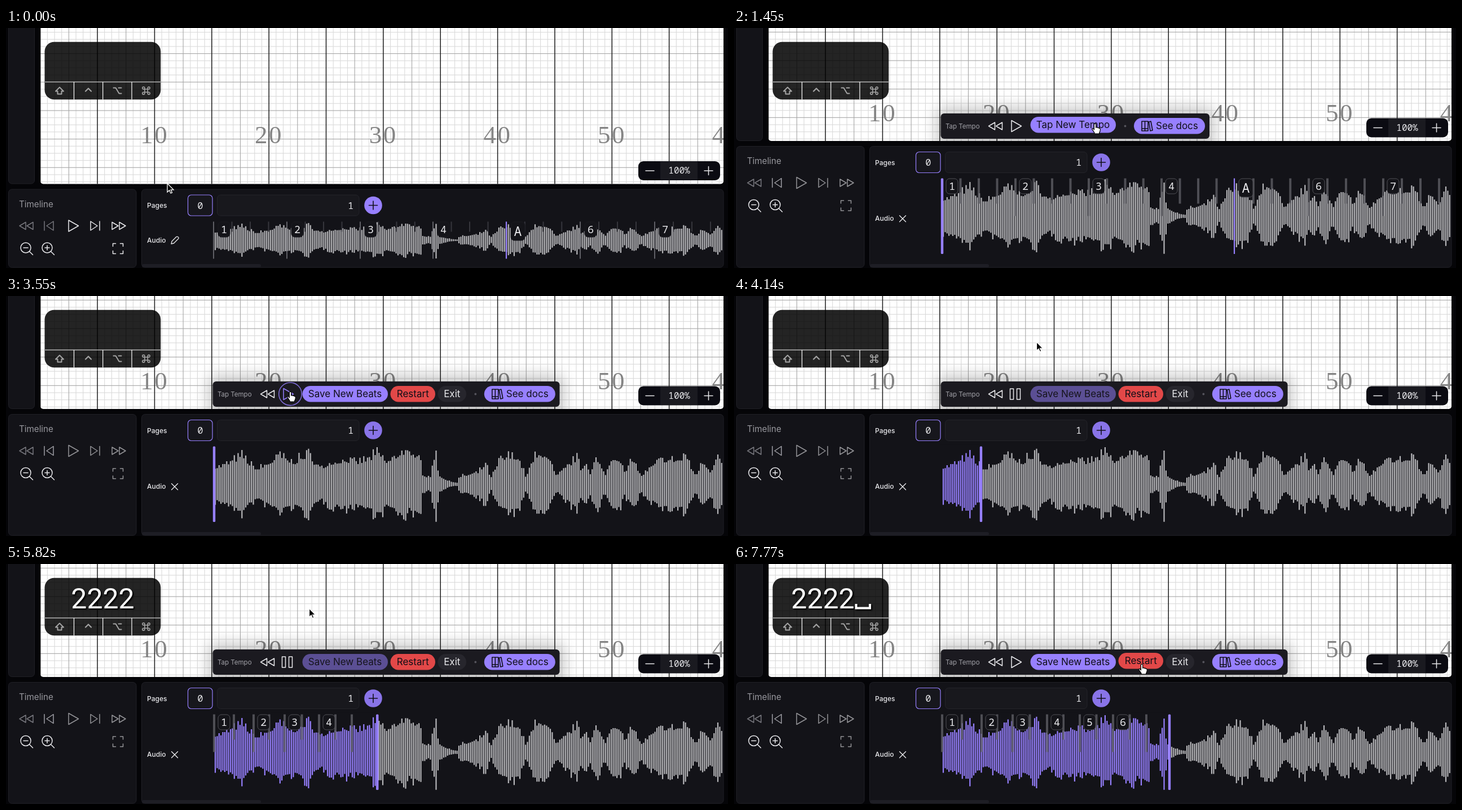
Write an HTML page that moves like this. It is 1280 px wide and 427 px high and loops after 8 s.

```html
<!DOCTYPE html>
<html lang="en">
<head>
<meta charset="utf-8">
<title>Tap tempo</title>
<style>
html, body { margin: 0; width: 100%; height: 100%; overflow: hidden; background: #050508; }
svg { display: block; width: 100%; height: 100%; }
text { font-family: Inter, "Open Sans", sans-serif; white-space: pre; }
.mono { font-family: "Noto Sans Mono", "DejaVu Sans Mono", monospace; }
.serif { font-family: "Liberation Serif", "Noto Serif", serif; letter-spacing: 2.5px; }
.keys { font-family: Roboto, "Liberation Sans", sans-serif; }
.icon { fill: none; stroke-linecap: round; stroke-linejoin: round; }
</style>
</head>
<body>
<svg id="stage" viewBox="0 0 1280 427" xmlns="http://www.w3.org/2000/svg"></svg>
<script>
const LOOP = 8000, FPS = 22;
const EDIT_AT = 360, TAP_AT = 2270, RING_AT = 3540, PLAY_AT = 3610, SPEED = 0.131;
const START_X = 369, STOP_X = 772;
const STOP_AT = PLAY_AT + (STOP_X - START_X) / SPEED - 8;
const BARLINES = [369, 439, 494, 555, 613, 672, 731];
const MEASURES = [368, 498, 628, 757, 887, 1018, 1150, 1282];
const PURPLE = '#9780ff', INK = '#100f17', PANEL = '#131318', EDGE = '#202026', LIGHT = '#e9e9ec', GREY = '#98989e';
const UNIT = 12.67, LEFT = 60.7;

// markup helpers
const rect = (x, y, w, h, r, fill, extra = '') =>
  `<rect x="${x}" y="${y}" width="${w}" height="${h}" rx="${r}" fill="${fill}" ${extra}/>`;
const text = (x, y, s, size, fill, anchor = 'start', extra = '') =>
  `<text x="${x}" y="${y}" font-size="${size}" fill="${fill}" text-anchor="${anchor}" ${extra}>${s}</text>`;
const icon = (x, y, d, color = LIGHT, width = 1.5, extra = '') =>
  `<path class="icon" transform="translate(${x} ${y})" d="${d}" stroke="${color}" stroke-width="${width}" ${extra}/>`;
const group = (id, body, extra = '') => `<g id="${id}" ${extra}>${body}</g>`;
const span = (n, f) => Array.from({ length: n }, (_, i) => f(i)).join('');
const vline = (x, y, h, w, color) => rect(x - w / 2, y, w, h, 0, color);

const D = {
  rewind: 'M-1-6.5V6.5L-12 0zM12-6.5V6.5L1 0z',
  forward: 'M1-6.5V6.5L12 0zM-12-6.5V6.5L-1 0z',
  prev: 'M8-8V8L-4 0zM-8-8V8',
  next: 'M-8-8V8L4 0zM8-8V8',
  play: 'M-8-10V10L9.5 0z',
  pause: 'M-9-9.500H-3V9.500H-9zM3-9.500H9V9.500H3z',
  lens: 'M7.500-1.500a9 9 0 1 1-18 0a9 9 0 1 1 18 0M5 5L11 11M-5.500-1.500H2.500',
  plusBar: 'M-1.500-5.500V2.500',
  full: 'M-9-4V-9H-4M4-9H9V-4M9 4V9H4M-4 9H-9V4',
  pencil: 'M-6.500 6.500L-5.500 2L2.500-6Q4-7 5.700-5.500T6-2.500L-2 5.500z',
  cross: 'M-5.500-5.500L5.500 5.500M5.500-5.500L-5.500 5.500',
  minus: 'M-7.500 0H7.500',
  plus: 'M-7.500 0H7.500M0-7.500V7.500',
  books: 'M-9-8H-3.500V9H-9zM-3.500-8H2V9H-3.500zM-9 5H2M3.500-7L7-8L10 8L6 9z',
  shift: 'M0-6.500L7 .5H3.500V5.500H-3.500V.5H-7z',
  ctrl: 'M-5 1.500L0-3.500L5 1.500',
  option: 'M-7-5H-3L3 5H7M2-5H7',
  arrow: 'M0 0V15.500L3.600 12.200L6 17.500L8.500 16.400L6.200 11.300H11z',
  hand: 'M-.6-.2a1.600 1.600 0 0 1 3.200 0V5c1-.8 2.600-.5 2.900.6 1-.6 2.400-.2 2.700.9 1.200-.4 2.200.4 2.200 1.600 0 4-.8 5-1.800 6.500V16H0v-1.500C-1 12.500-3 10-4.200 8.200c-.8-1.300.9-2.400 2-1.200L-.6 8.500z'
};

function gridLines() {
  const shade = i => i % 8 === 0 ? '#1c1c1c' : i % 4 === 0 ? '#a6a6a6' : '#dadada';
  const cols = i => vline(LEFT + i * UNIT, -20, 360, i % 8 ? 1.1 : 1.5, shade(i));
  const rows = i => rect(LEFT, 45.5 + (i - 4) * UNIT - .5, 1215, 1.1, 0, i % 4 ? '#dadada' : '#a6a6a6');
  const ids = [...Array(97).keys()];
  return ids.filter(i => i % 4).map(cols).join('') + span(24, rows) +
    ids.filter(i => i % 4 === 0).map(cols).join('') +
    ['10', '20', '30', '40', '50', '40'].map((s, i) =>
      text(LEFT + UNIT * 16 * (i + 1) - 25.2, 204.5, s, 45, '#858585', 'start', 'class="serif"')).join('');
}

// loudness: x position and half height in px
const LOUD = [[369, 34], [385, 38], [400, 46], [412, 52], [420, 59], [432, 40], [446, 30], [458, 38], [470, 46],
  [483, 52], [486, 67], [490, 52], [512, 44], [524, 52], [538, 62], [547, 42], [560, 32], [572, 42], [604, 49],
  [618, 42], [650, 54], [660, 64], [676, 44], [689, 54], [703, 68], [716, 52], [734, 66], [738, 20], [752, 11],
  [757, 50], [763, 62], [767, 18], [785, 6], [800, 3], [804, 15], [838, 24], [850, 42], [860, 12], [875, 48],
  [890, 56], [908, 54], [922, 14], [936, 52], [957, 62], [976, 15], [1012, 52], [1020, 28], [1028, 46],
  [1036, 22], [1046, 52], [1062, 18], [1075, 54], [1089, 50], [1096, 22], [1113, 50], [1125, 16], [1160, 48],
  [1198, 50], [1204, 68], [1210, 42], [1223, 18], [1236, 46], [1250, 24], [1262, 66], [1272, 32]];

function wavePath() {
  let seed = 7, d = '';
  const rnd = () => (seed = seed * 16807 % 2147483647) / 2147483647;
  for (let x = 371, k = 0; x < 1271; x += 3.375) {
    while (LOUD[k + 1][0] < x) k++;
    const [[x0, a], [x1, b]] = [LOUD[k], LOUD[k + 1]];
    const h = a + (b - a) * (x - x0) / (x1 - x0);
    // mostly even bars with a few sharp peaks
    const reach = () => Math.min(67, h * (.8 + .34 * rnd() ** 3)).toFixed(1);
    d += `M${x.toFixed(1)} -${reach()}V${reach()}`;
  }
  return d;
}

const badge = (x, y, s, edge) => {
  const big = s === 'A', w = big ? 25 : 21, h = big ? 33 : 27;
  return rect(x + 8, y + .5, w, h, 6, '#141419', `stroke="${edge}"`) +
    text(x + 8 + w / 2, y + (big ? 25.5 : 20.5), s, big ? 23 : 18.5, LIGHT, 'middle', 'class="mono"');
};
const measureName = i => i === 4 ? 'A' : i + 1;
const editMark = (x, h) => vline(x, 267.5, h, 4, 'rgba(98,98,104,.75)');

function beatMarks(edit) {
  const y = edit ? 267.5 : 344.5;
  let lines = '', names = '';
  MEASURES.slice(0, -1).forEach((x, i) => {
    const step = (MEASURES[i + 1] - x) / 4;
    for (let q = 0; q < 4; q++) {
      const bx = x + step * q;
      if (i === 4 && q === 0) lines += vline(x, y, edit ? 134.5 : 66, 2.2, PURPLE);
      else if (edit) lines += editMark(bx + 1, q ? 45 : 67);
      else lines += vline(bx, y, q ? 18 : 66, 2, q ? '#36363c' : '#606066');
    }
    names += badge(x, y, measureName(i), edit ? '#505056' : '#1b1b20');
  });
  return lines + names;
}

function tapMarks() {
  let out = editMark(START_X, 67);
  for (let i = 1; i < BARLINES.length; i++) {
    const a = BARLINES[i - 1], b = BARLINES[i];
    out += group('tap' + i, editMark((a + b) / 2, 45) + editMark(b, 67) + badge(a - 1, 267.5, i, '#505056'));
  }
  return out;
}

const pill = (x, w, fill, label, ink) =>
  rect(x, 160, w, 28.5, 14.25, fill) + text(x + w / 2, 180.4, label, 17, ink, 'middle');

const stage = document.getElementById('stage');
stage.innerHTML = `
<defs>
  <clipPath id="field"><rect id="fieldBox" x="61" y="-20" width="1211" rx="5"/></clipPath>
  <clipPath id="played"><rect id="playedBox" x="360" y="-80" height="160"/></clipPath>
  <clipPath id="track"><rect x="366" y="0" width="905.5" height="427"/></clipPath>
  <filter id="soft" x="-20%" y="-150%" width="140%" height="400%"><feGaussianBlur stdDeviation="13"/></filter>
  <path id="bars" d="${wavePath()}" stroke-width="2.2"/>
</defs>
${rect(0, 0, 1280, 427, 0, '#050508')}
${rect(4.5, -20, 46, 297, 6, PANEL, `id="side" stroke="${EDGE}"`)}
<g clip-path="url(#field)">
  ${rect(61, -20, 1211, 320, 0, '#fff')}
  ${group('grid', gridLines())}
  ${rect(358, 140, 494, 80, 14, '#000', 'id="shade" opacity=".2" filter="url(#soft)"')}
</g>
${rect(4.5, 287, 226.5, 139, 6, PANEL, `id="panelA" stroke="${EDGE}"`)}
${rect(240.5, 287, 1031.5, 139, 6, PANEL, `id="panelB" stroke="${EDGE}"`)}
${rect(241, 420, 211, 6, 3, '#1e1e25')}
${group('lift',
  rect(1121, 237, 145, 34, 9, '#0b0b12') + rect(1160, 237.5, 66, 33, 0, '#1a1a20') +
  icon(1141.5, 254, D.minus) + icon(1245.5, 254, D.plus) +
  text(1193.5, 259.2, '100%', 16, LIGHT, 'middle', 'class="mono"') +
  text(23, 318.5, 'Timeline', 15.2, GREY) +
  icon(36, 352, D.rewind, '#77777d') + icon(76, 352, D.prev, '#77777d', 1.5, 'id="back"') +
  group('transport', icon(119, 352, D.play) + icon(158, 352, D.next) + icon(200, 352, D.forward) + icon(198.5, 392.5, D.full)) +
  icon(36.5, 392.5, D.lens) + icon(74.5, 392.5, D.lens + D.plusBar) +
  text(250, 320, 'Pages', 12, LIGHT, 'start', 'font-weight="500"') +
  rect(322.5, 297, 43.5, 37, 6, '#17171d', `stroke="${PURPLE}" stroke-width="1.2"`) +
  text(344.3, 321.5, '0', 17, LIGHT, 'middle', 'class="mono"') +
  rect(374.5, 297, 251.5, 37, 6, '#18181d', 'stroke="#24242a"') +
  text(611, 321.5, '1', 17, LIGHT, 'middle', 'class="mono"') +
  `<circle id="add" cx="651" cy="315.5" r="15.8" fill="${PURPLE}"/>` + icon(651, 315.5, D.plus, INK, 1.6))}
${group('audio', text(250, 381.7, 'Audio', 12, LIGHT, 'start', 'font-weight="500"') +
  icon(299.5, 377.5, D.pencil, LIGHT, 1.3, 'id="pencil"') + icon(299, 377.5, D.cross, LIGHT, 1.4, 'id="close"'))}
<g clip-path="url(#track)">
  <g id="wave"><use href="#bars" stroke="#b6b6b9"/>
    <g id="done" clip-path="url(#played)">${rect(360, -70, 912, 140, 0, PANEL)}<use href="#bars" stroke="${PURPLE}"/></g></g>
  ${group('restBeats', beatMarks(false))}
  ${group('editBeats', beatMarks(true))}
  ${group('taps', tapMarks())}
  ${rect(-2.2, 267.5, 4.4, 134.5, 1.5, PURPLE, 'id="head"')}
</g>
${group('tools',
  rect(366.5, 152, 476.5, 45, 6, '#1b1a20', 'id="tray"') +
  text(375, 178.7, 'Tap Tempo', 11.5, '#a2a2a8') +
  icon(463.5, 174.5, D.rewind) +
  icon(500, 174.5, D.play, LIGHT, 1.5, 'id="play"') + icon(498.5, 174.5, D.pause, LIGHT, 1.5, 'id="pause"') +
  `<circle id="ring" cx="504" cy="174.3" r="20.3" fill="none" stroke="${PURPLE}" stroke-width="1.6" stroke-opacity=".8"/>` +
  group('main', rect(525.5, 160, 151.5, 28.5, 14.25, PURPLE) + text(601, 180.4, '', 17, INK, 'middle', 'id="label"')) +
  group('extra', group('restart', pill(681.5, 79.5, '#e24848', 'Restart', INK)) + pill(765.5, 50.5, '#27262d', 'Exit', LIGHT)) +
  group('docs', '<circle cx="693.5" cy="174.5" r="1.9" fill="#56555d"/>' + rect(709, 160, 126, 28.5, 14.25, PURPLE) +
    icon(732, 174, D.books, INK, 1.6) + text(748, 180.4, 'See docs', 17, INK)))}
${rect(68.5, 24.7, 205.8, 102.5, 17, 'rgba(0,0,0,.86)')}
<path d="M69 96H274M120.5 96V127M171.7 96V127M223 96V127" stroke="#fff" stroke-width="1.2"/>
${icon(95, 112, D.shift, '#a4a4a4', 2)}
${icon(146, 111, D.ctrl, '#a4a4a4', 2.2)}
${icon(197.5, 111.5, D.option, '#a4a4a4', 2)}
${icon(248.5, 111.5, 'M-2.700-2.700H2.700V2.700H-2.700z' +
  [[-1, -1], [1, -1], [-1, 1], [1, 1]].map(([a, b]) => `M${a * 4.7 - 2} ${b * 4.7}a2 2 0 1 1 4 0a2 2 0 1 1-4 0`).join(''), '#a4a4a4', 1.6)}
<g style="filter:drop-shadow(2px 2px 1px #000)">
  ${text(171.5, 79.2, '', 50, '#fff', 'middle', 'id="keys" class="keys"')}
  <path id="space" d="M216.5 71V78.5H241V71" fill="none" stroke="#fff" stroke-width="4"/>
</g>
${group('cursor', `<path id="arrow" d="${D.arrow}" fill="#000" stroke="#fff" stroke-width="1.3"/>` +
  `<path id="hand" d="${D.hand}" fill="#fff" stroke="#000" stroke-width="1.2"/>`)}`;

const el = {};
stage.querySelectorAll('[id]').forEach(n => el[n.id] = n);
const show = (id, on) => el[id].style.display = on ? '' : 'none';
const set = (id, name, v) => el[id].setAttribute(name, v);
const move = (id, x, y) => set(id, 'transform', `translate(${x} ${y})`);
const clamp = v => Math.max(0, Math.min(1, v));

// pointer stops: time, x, y
const PATH = [[0, 286, 276.5], [10, 286, 276.5], [290, 298, 372], [440, 298, 372], [820, 480, 358], [915, 480, 358],
  [1440, 639, 172], [1640, 640, 172], [2870, 640, 172], [3230, 503, 172], [3590, 503, 172], [4200, 537.5, 79],
  [7140, 537.5, 79], [7765, 722, 180], [LOOP, 722, 180]];

function pointer(t) {
  const i = PATH.findIndex((p, k) => k && t <= p[0]);
  const [t0, x0, y0] = PATH[i - 1], [t1, x1, y1] = PATH[i];
  const u = clamp((t - t0) / (t1 - t0)), e = u * u * (3 - 2 * u);
  return [x0 + (x1 - x0) * e, y0 + (y1 - y0) * e];
}

function hovered(x, y, edit, tapping) {
  const inside = (l, r, top = 158, bottom = 189) => x > l && x < r && y > top && y < bottom;
  if (!edit) return inside(288, 311, 366, 389) ? 'pencil' : '';
  if (inside(484, 523)) return 'play';
  if (inside(526, 677)) return 'main';
  if (tapping && inside(682, 761)) return 'restart';
  return '';
}

function render(t) {
  const edit = t >= EDIT_AT, tapping = t >= TAP_AT;
  const playing = t >= PLAY_AT && t < STOP_AT, stopped = t >= STOP_AT;
  const [x, y] = pointer(t), over = hovered(x, y, edit, tapping);
  const headX = stopped ? STOP_X : START_X + Math.max(0, t - PLAY_AT) * SPEED;
  const taps = BARLINES.slice(1).filter(b => b <= headX).length;
  const lift = edit ? 76.5 : 0;

  // page layout
  set('side', 'height', 297 - lift);
  set('fieldBox', 'height', 297.5 - lift);
  move('grid', 0, edit ? -38.25 : 0);
  move('lift', 0, -lift);
  move('audio', 0, edit ? -38.25 : 0);
  for (const id of ['panelA', 'panelB']) {
    set(id, 'y', 287 - lift);
    set(id, 'height', 139 + lift);
  }
  set('transport', 'opacity', edit ? .6 : 1);
  set('back', 'stroke', edit ? '#a0a0a6' : '#77777d');
  set('add', 'opacity', edit ? .9 : 1);
  show('pencil', !edit);
  show('close', edit);

  // waveform
  set('wave', 'transform', edit ? 'translate(0 334.8)' : 'translate(0 377.5) scale(1 .485)');
  set('playedBox', 'width', headX - 360);
  show('done', headX > START_X + 1);
  show('head', edit);
  move('head', headX, 0);
  show('restBeats', !edit);
  show('editBeats', edit && !tapping);
  show('taps', taps > 0);
  for (let i = 1; i < BARLINES.length; i++) show('tap' + i, i <= taps);

  // toolbar
  show('tools', edit);
  show('shade', edit);
  set('tray', 'width', tapping ? 615 : 476.5);
  set('shade', 'width', tapping ? 632 : 494);
  move('docs', tapping ? 138.8 : 0, 0);
  show('extra', tapping);
  el.label.textContent = tapping ? 'Save New Beats' : 'Tap New Tempo';
  const fade = clamp((t - PLAY_AT) / 150) - clamp((t - STOP_AT) / 100);
  set('main', 'opacity', 1 - .48 * fade);
  move('main', 0, over === 'main' && !playing ? -2 : 0);
  move('restart', 0, over === 'restart' ? -2 : 0);
  show('play', !playing);
  show('pause', playing);
  const tint = over === 'play' ? PURPLE : LIGHT;
  set('play', 'stroke', tint);
  set('pause', 'stroke', tint);
  show('ring', t >= RING_AT && over === 'play');

  // key overlay
  el.keys.textContent = '2'.repeat(stopped ? 4 : taps);
  set('keys', 'x', stopped ? 157.5 : 171.5);
  show('space', stopped);

  move('cursor', x, y);
  show('hand', over);
  show('arrow', !over);
}

const began = performance.now();
function tick() {
  const t = (performance.now() - began) % LOOP;
  render(Math.floor((t + 5) * FPS / 1000) * 1000 / FPS);
  requestAnimationFrame(tick);
}
tick();
</script>
</body>
</html>
```
